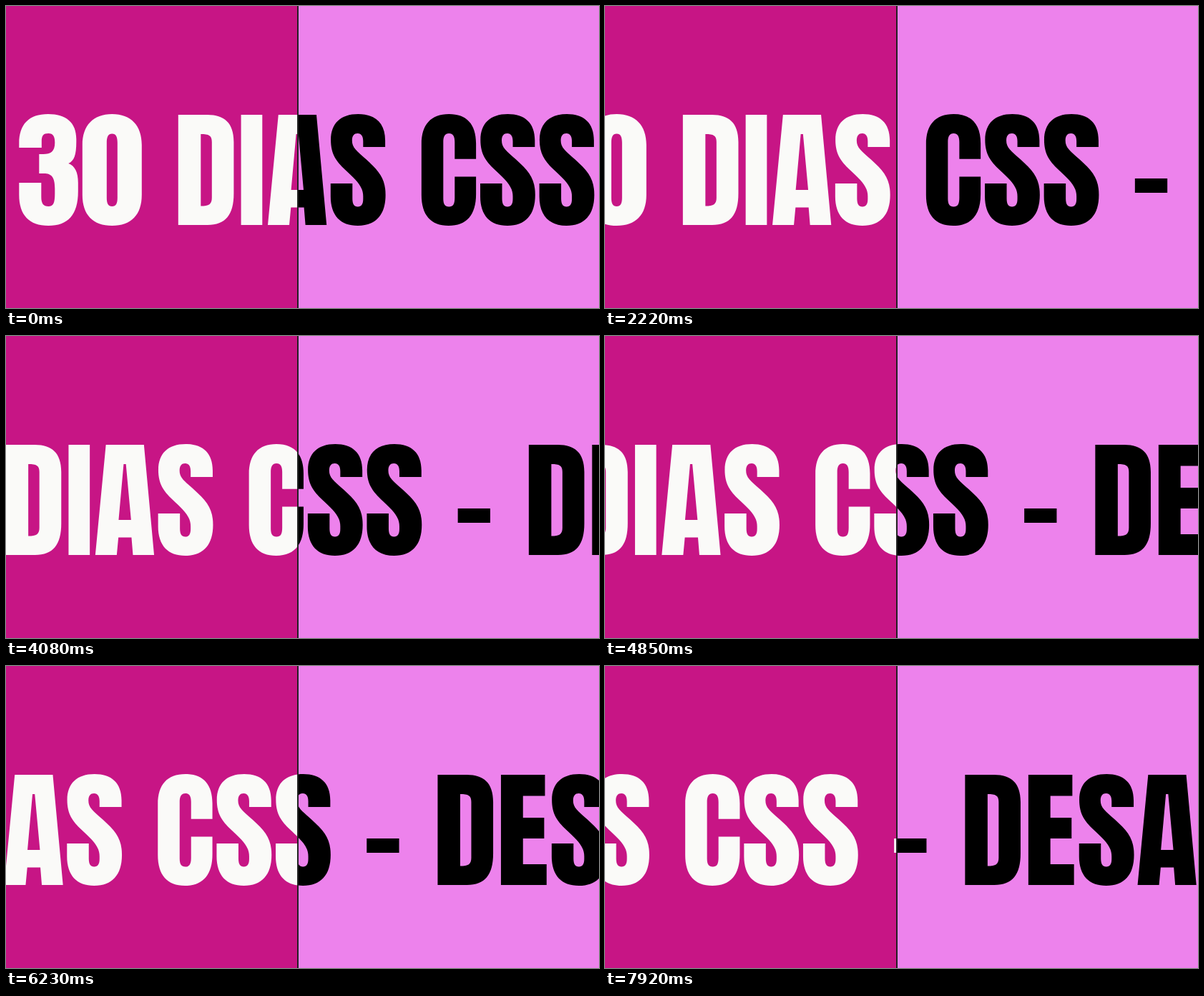
An HTML page for the animation above (8 s loop, 829x422 px).

```html
<!DOCTYPE html>
<html lang="pt">
<head>
<meta charset="utf-8">
<title>30 dias CSS</title>
<style>
  html, body { margin: 0; width: 100%; height: 100%; overflow: hidden; background: #c71585; }
  svg { display: block; width: 100vw; height: 100vh; }
</style>
</head>
<body>
<svg viewBox="0 0 829 422" role="img" aria-label="30 DIAS CSS - DESA">
  <defs>
    <clipPath id="leftHalf"><rect width="408" height="422"/></clipPath>
    <clipPath id="rightHalf"><rect x="408" width="421" height="422"/></clipPath>
    <g id="words" fill-rule="evenodd"></g>
  </defs>
  <rect width="408" height="422" fill="#c71585"/>
  <rect x="408" width="421" height="422" fill="#ed82ec"/>
  <g clip-path="url(#leftHalf)" fill="#fafaf8"><use class="strip" href="#words"/></g>
  <g clip-path="url(#rightHalf)" fill="#000"><use class="strip" href="#words"/></g>
  <rect x="407" width="2" height="422" fill="#222"/>
</svg>
<script>
const LOOP = 8000;
const STEP = 1000 / 13;   // the strip advances 13 times a second
const LEAD = 11;
const SHIFT = 4.55;       // pixels per step

// Heavy condensed capitals, each starting at x = 0
const glyphs = {
  '3': 'M0 198V192C0 165 14 151 40.5 151C66 151 80 163 80 186V190C80 208 77 216.5 69 220C78 223.5 82.5 232 82.5 247V259C82.5 292 68 307 41 307C14 307 0 292 0 264V247H31V267C31 276 34 280 41 280C48 280 50 275 50 262V255C50 239 45 234 35 234H28V207H34C44 207 50 203.5 50 191C50 182 47.5 178 41 178C34 178 31.5 181 31.5 189V198Z',
  '0': 'M41.5 151C15 151 0 167 0 194V264C0 292 15 307 41.5 307C68 307 83 292 83 264V194C83 167 68 151 41.5 151ZM41.5 178.5C47 178.5 49 183 49 191V268C49 276 47 280 41.5 280C36 280 34 276 34 268V191C34 183 36 178.5 41.5 178.5Z',
  D: 'M0 152H41C64 152 77.6 163 77.6 190V262C77.6 292 66 306 41 306H0ZM31.5 179V279.5C43 279.5 47 277 47 268V190C47 181 43 179 31.5 179Z',
  I: 'M0 152H29.7V306H0Z',
  A: 'M0 306L14.8 152H68L82.2 306H52.6L50.6 281.5H32.3L30 306ZM39.6 179H42.8L50 257H32.6Z',
  S: 'M45.5 197H76.3V188C76.3 163 62 151 38.5 151C14 151 .3 164 .3 187C.3 207 8 217 20 228.5C36 243.5 45.5 252 45.5 266V269.5C45.5 277 43 280.5 38 280.5C33 280.5 30.5 277 30.5 269V248H0V266C0 293 14 307 38 307C63 307 76.8 292 76.8 264C76.8 241 68 231 50 214.5C36 202 30 198 30 188C30 181 33 178 37.8 178C43 178 45.5 182 45.5 189Z',
  C: 'M46.5 213.7H76.3V192C76.3 165 63 151 38.5 151C13 151 0 166 0 193V264C0 292 13 307 38 307C63 307 76.3 292 76.3 263V238.4H46.5V268C46.5 277 44 280.5 38.5 280.5C33 280.5 30.5 277 30.5 269V190C30.5 182 33 178 38.5 178C44 178 46.5 182 46.5 190Z',
  E: 'M0 152H61.5V181.5H30.8V212H60.4V241H30.8V277H63.8V306H0Z',
  '-': 'M0 241H45.3V261H0Z'
};

const letters = [
  ['3', 18.3], ['0', 106.8],
  ['D', 240.8], ['I', 328.6], ['A', 366], ['S', 453.8],
  ['C', 580.8], ['S', 663], ['S', 745.6],
  ['-', 872.8],
  ['D', 972], ['E', 1060.5], ['S', 1131.4], ['A', 1213.2]
];

document.getElementById('words').innerHTML = letters
  .map(([ch, x]) => `<path transform="translate(${x})" d="${glyphs[ch]}"/>`)
  .join('');

const strips = document.querySelectorAll('.strip');

function draw(t) {
  const step = Math.floor((t + LEAD) / STEP);
  const x = -Math.min(step, 103) * SHIFT;
  strips.forEach(s => s.setAttribute('transform', `translate(${x.toFixed(2)})`));
}

const start = performance.now();
function tick() {
  draw((performance.now() - start) % LOOP);
  requestAnimationFrame(tick);
}
tick();
</script>
</body>
</html>
```
